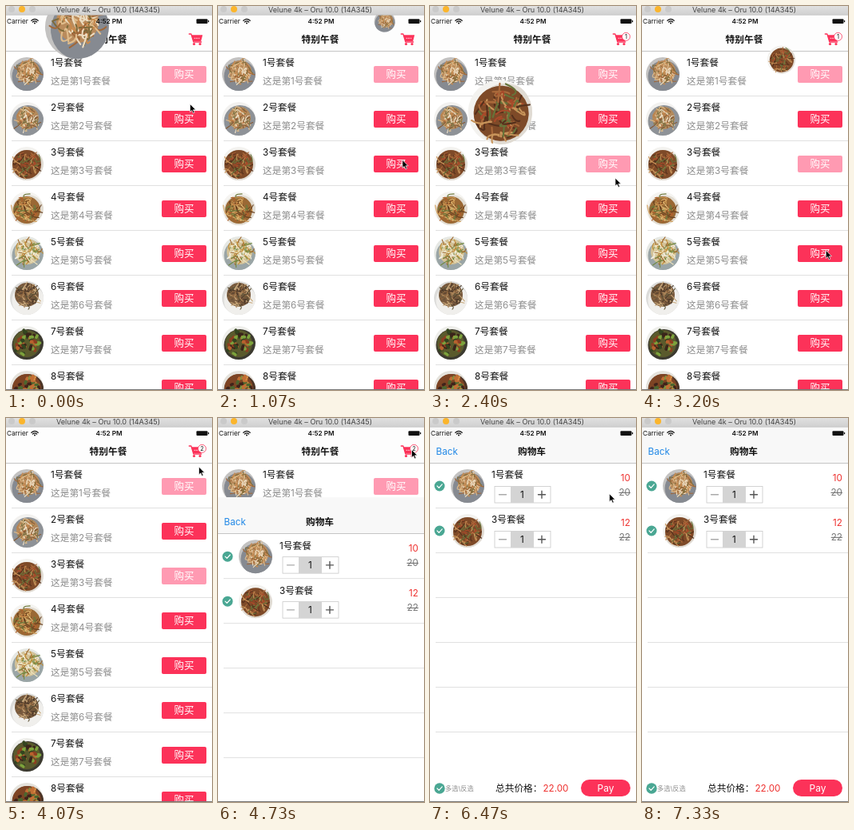
Write an HTML page that moves like this. It is 258 px wide and 480 px high and loops after 7390 ms.

```html
<!DOCTYPE html>
<html lang="zh">
<head>
<meta charset="utf-8">
<title>特别午餐</title>
<style>
html, body { margin: 0; width: 100%; height: 100%; overflow: hidden; background: #fff; }
svg { display: block; width: 258px; height: 480px; }
text { font: 11.7px Inter, "Noto Sans CJK SC", "Noto Sans CJK", sans-serif; fill: #111; }
.bold { font-weight: 600; }
.small { font-size: 8.2px; }
.mid { text-anchor: middle; }
.end { text-anchor: end; }
.gray { fill: #8e8e8e; }
.red { fill: #ee302e; }
.white { fill: #fff; }
.old { fill: #777; text-decoration: line-through; }
</style>
</head>
<body>
<svg id="stage" viewBox="0 0 258 480"></svg>
<script>
const LOOP = 7390;
const PINK = '#fc3259', PALE = '#ff9ab2', GREEN = '#4aa793';

const text = (x, y, s, cls = '', extra = '') => `<text x="${x}" y="${y}" class="${cls}" ${extra}>${s}</text>`;
const rect = (x, y, w, h, fill, extra = '') => `<rect x="${x}" y="${y}" width="${w}" height="${h}" fill="${fill}" ${extra}/>`;
const disc = (x, y, r, fill, extra = '') => `<circle cx="${x}" cy="${y}" r="${r}" fill="${fill}" ${extra}/>`;
const path = (d, stroke, width, extra = '') =>
  `<path d="${d}" fill="none" stroke="${stroke}" stroke-width="${width}" stroke-linecap="round" stroke-linejoin="round" ${extra}/>`;
const times = (n, fn) => Array.from({ length: n }, (_, i) => fn(i)).join('');
const rowY = i => 85 + 56 * i;

function random(seed) {
  return () => (seed = (seed * 16807) % 2147483647) / 2147483647;
}

// table, plate, food, food x, food y, food radius, strand colours
const dishes = [
  ['#c3c2c1', '#868a91', '#b98b5c', 2, -3, 14, ['#e0bd8c', '#a0683a', '#ecdcc0', '#7d6a3a', '#c98a4c']],
  ['#f2f1ef', '#8e9297', '#b38a5c', 1, -1, 14, ['#dfbd8c', '#855a36', '#efe2ca', '#7a7446', '#c08048']],
  ['#f3f2ef', '#e0dbd3', '#7e4a28', 0, 1, 18, ['#a9693a', '#55301c', '#c8945a', '#66743a', '#a84a2a']],
  ['#f5f4f1', '#e2ddd3', '#9a6834', 0, 2, 17, ['#cf9a54', '#69401f', '#dfb874', '#6d7a3c', '#b0622f']],
  ['#e6e8e4', '#9aa5a6', '#d3c298', 1, -2, 16, ['#f3efe2', '#c4913a', '#738a43', '#efe6c0', '#a06c34']],
  ['#dcdcda', '#f0efec', '#785a3e', 0, -4, 15, ['#a98358', '#493526', '#c8a87c', '#8a623c', '#5c5036']],
  ['#eeeeea', '#3c3a30', '#5a5a2c', 0, 1, 17, ['#7da23c', '#8d3e20', '#33451f', '#b8622e', '#3a251a']],
  ['#e4e2dc', '#4a3325', '#7d4424', 0, 1, 18, ['#c26e34', '#4c662e', '#40231a', '#d48c44', '#7a9440']]
];

function dish([table, plate, food, x, y, r, tones], i) {
  const rnd = random(771 + i * 97), chunky = i > 5;
  const reach = chunky ? 7 : 17;
  const strands = times(chunky ? 36 : 64, k => {
    const a = rnd() * 6.283, d = Math.sqrt(rnd()) * r * 0.85;
    const px = x + Math.cos(a) * d, py = y + Math.sin(a) * d;
    const n = () => ((rnd() - 0.5) * reach).toFixed(1);
    return path(`M${px.toFixed(1)} ${py.toFixed(1)}q${n()} ${n()} ${n()} ${n()}`, tones[k % tones.length], chunky ? 3.6 : 1.1);
  });
  return `<g id="dish${i}" clip-path="url(#round)">${disc(0, 0, 21.5, table)}${disc(1.5, 3, 20, plate)}${disc(x, y, r, food)}${strands}</g>`;
}

const thumb = (i, x, y) => `<use href="#dish${i}" x="${x}" y="${y}"/>`;
const line = y => rect(7, y, 251, 1, '#e0e0e0');
const tick = (x, y, r) => disc(x, y, r, GREEN) + path(`M${x - 3} ${y}l2.2 2.3 4-4.4`, '#fff', 1.2);

const listRow = i => {
  const y = rowY(i);
  return thumb(i, 26, y) + text(56, y - 9.6, `${i + 1}号套餐`) +
    text(56, y + 13.2, `这是第${i + 1}号套餐`, 'gray') +
    rect(195, y - 10, 56, 21, PINK, `rx="2" id="buy${i}"`) +
    text(223, y + 4.8, '购买', 'white mid', 'style="font-size:12.5px"') + line(y + 27);
};

const cartRow = (id, row, price, old) => {
  const y = rowY(row);
  return tick(12, y, 6.5) + thumb(id, 47, y) + text(77, y - 9.6, `${id + 1}号套餐`) +
    rect(81, y + 0.5, 70, 20.5, '#fff', 'stroke="#c9c9c9" stroke-width=".8"') +
    rect(101, y + 0.5, 29, 20.5, '#d4d4d4') +
    path(`M86.5 ${y + 10.7}h9`, '#aaa', 1.4) +
    path(`M135.5 ${y + 10.7}h9m-4.5-4.5v9`, '#555', 1.4) +
    text(115.5, y + 15, 1, 'mid') +
    text(251, y - 6, price, 'red end') + text(251, y + 12, old, 'old end');
};

const cartIcon = path('M229.3 35h2.6l3 10h9.8', PINK, 1.3) +
  `<path d="M232.2 36.3h14l-2 7.6h-9.7z" fill="${PINK}"/>` +
  path('M236 40.3h6', '#fff', 0.8, 'stroke-dasharray="1 1.6"') +
  disc(235.5, 47.5, 1.6, PINK) + disc(243, 47.5, 1.6, PINK);

const list = rect(0, 11, 258, 469, '#fff') + times(8, listRow) +
  rect(0, 11, 258, 45.5, '#fdfdfd') + rect(0, 56, 258, 0.8, '#b8b8b8') +
  text(128, 46, '特别午餐', 'bold mid') + cartIcon +
  `<g id="badge">${disc(245.5, 38.3, 5, '#fff', `stroke="${PINK}" stroke-width=".8"`)}${text(245.5, 41, 1, 'mid', 'id="count" style="font-size:7.5px"')}</g>`;

const cart = rect(0, 11, 258, 469, '#fff') + rect(0, 11, 258, 45.5, '#f8f8f8') +
  rect(0, 56, 258, 0.8, '#b8b8b8') +
  text(7.5, 45.8, 'Back', '', 'style="fill:#2188e6"') + text(127.5, 46, '购物车', 'bold mid') +
  cartRow(0, 0, 10, 20) + cartRow(2, 1, 12, 22) + times(6, i => line(rowY(i) + 27)) +
  rect(0, 448, 258, 32, '#fff') + tick(12, 463, 6.7) +
  text(19, 466, '多选\\反选', 'small gray') + text(82, 467, '总共价格：') +
  text(173.5, 467, '22.00', 'red end') +
  rect(189, 452, 62, 21, PINK, 'rx="10.5"') + text(220, 467, 'Pay', 'white mid', 'style="font-size:12px"');

const status = text(1, 22, 'Carrier', 'small') +
  path('M31.8 18.3q4.2-3.8 8.4 0M33.4 20q2.6-2.3 5.2 0', '#111', 1.2) + disc(36, 21.6, 1, '#111') +
  text(129, 22, '4:52 PM', 'small bold mid') +
  rect(238.5, 16.3, 14, 5.6, '#111', 'rx="1"') + rect(253, 18, 1.2, 2.2, '#111');

const titleBar = rect(0, 0, 258, 11.3, 'url(#chrome)') + rect(0, 10.8, 258, 0.6, '#b9b9b9') +
  disc(7, 4, 4, '#cacaca') + disc(20, 4, 4, '#fbb52c') + disc(33, 4, 4, '#cacaca') +
  text(128, 7.8, 'Velune 4k – Oru 10.0 (14A345)', 'mid', 'style="font-size:9.1px;fill:#444"');

document.getElementById('stage').innerHTML = `<defs>
  <clipPath id="round"><circle r="21"/></clipPath>
  <linearGradient id="chrome" x2="0" y2="1"><stop stop-color="#e0e0e0"/><stop offset="1" stop-color="#d0d0d0"/></linearGradient>
  ${dishes.map(dish).join('')}</defs>
  ${list}<g id="cart">${cart}</g>
  <use id="fly0" href="#dish0"/><use id="fly2" href="#dish2"/>
  ${status}${titleBar}${rect(0, 479, 258, 1, '#777')}
  <path id="cursor" d="M0 0v10l2.3-2.1 1.6 3.6 1.7-.8-1.6-3.4h3.2z" fill="#000" stroke="#fff" stroke-width=".7"/>`;

const el = id => document.getElementById(id);
const show = (node, on) => node.setAttribute('visibility', on ? 'visible' : 'hidden');

// CSS-style cubic bezier with its outer points at 0 and 1
function bezier(x1, y1, x2, y2) {
  const at = (a, b, s) => 3 * a * s * (1 - s) ** 2 + 3 * b * s * s * (1 - s) + s ** 3;
  return x => {
    let lo = 0, hi = 1;
    for (let i = 0; i < 24; i++) {
      const m = (lo + hi) / 2;
      if (at(x1, x2, m) < x) lo = m; else hi = m;
    }
    return at(y1, y2, lo);
  };
}
const easeIn = bezier(0.42, 0, 1, 1), easeOut = bezier(0, 0, 0.58, 1), easeBoth = bezier(0.42, 0, 0.58, 1);

const flights = [
  { id: 0, start: -710, from: [26, 85], bend: [105, -28] },
  { id: 2, start: 1700, from: [26, 197], bend: [105, 101] }
];
const GOAL = [237, 30], FLIGHT = 2000;

// The dish swells for the first quarter, then shrinks into the basket.
function fly({ id, start, from, bend }, t) {
  const p = (t - start) / FLIGHT, node = el('fly' + id);
  show(node, p >= 0 && p < 1);
  el('buy' + id).setAttribute('fill', p >= 0 ? PALE : PINK);
  if (p < 0 || p >= 1) return;
  const [x, y] = from.map((a, k) => a * (1 - p) ** 2 + 2 * bend[k] * p * (1 - p) + GOAL[k] * p * p);
  const [dx, dy] = from.map((a, k) => (bend[k] - a) * (1 - p) + (GOAL[k] - bend[k]) * p);
  const scale = 1.14 * (p < 0.25 ? 1 + easeIn(p * 4) : 2 - 1.5 * easeOut((p - 0.25) / 0.75));
  const angle = Math.atan2(dy, dx) * 180 / Math.PI;
  node.setAttribute('transform', `translate(${x} ${y}) rotate(${angle}) scale(${scale})`);
}

// time, x, y
const route = [
  [0, 230.5, 122.5], [250, 230.5, 122.5], [950, 231, 192.5], [1750, 231, 192.5],
  [2300, 232, 215], [2450, 232, 215], [3150, 230.3, 305.5], [3350, 230.3, 305.5],
  [4250, 242.5, 39.5], [4800, 242.5, 39.5], [5500, 224.7, 94.7], [6650, 224.7, 94.7], [7300, 259, 268]
];

function moveCursor(t) {
  const next = route.findIndex(k => k[0] > t);
  show(el('cursor'), next > 0);
  if (next < 1) return;
  const a = route[next - 1], b = route[next];
  const p = easeBoth((t - a[0]) / (b[0] - a[0]));
  el('cursor').setAttribute('transform', `translate(${a[1] + (b[1] - a[1]) * p} ${a[2] + (b[2] - a[2]) * p})`);
}

function slideCart(t) {
  const s = (t - 4563) * 0.0183;
  show(el('cart'), s > 0);
  const left = s > 0 ? (1 + s) * Math.exp(-s) : 1;
  el('cart').setAttribute('transform', `translate(0 ${left < 0.001 ? 0 : 468 * left})`);
}

const begin = performance.now();
function draw() {
  const t = (performance.now() - begin) % LOOP;
  flights.forEach(f => fly(f, t));
  const count = flights.filter(f => t >= f.start + FLIGHT).length;
  show(el('badge'), count > 0);
  el('count').textContent = count;
  slideCart(t);
  moveCursor(t);
  requestAnimationFrame(draw);
}
draw();
</script>
</body>
</html>
```
